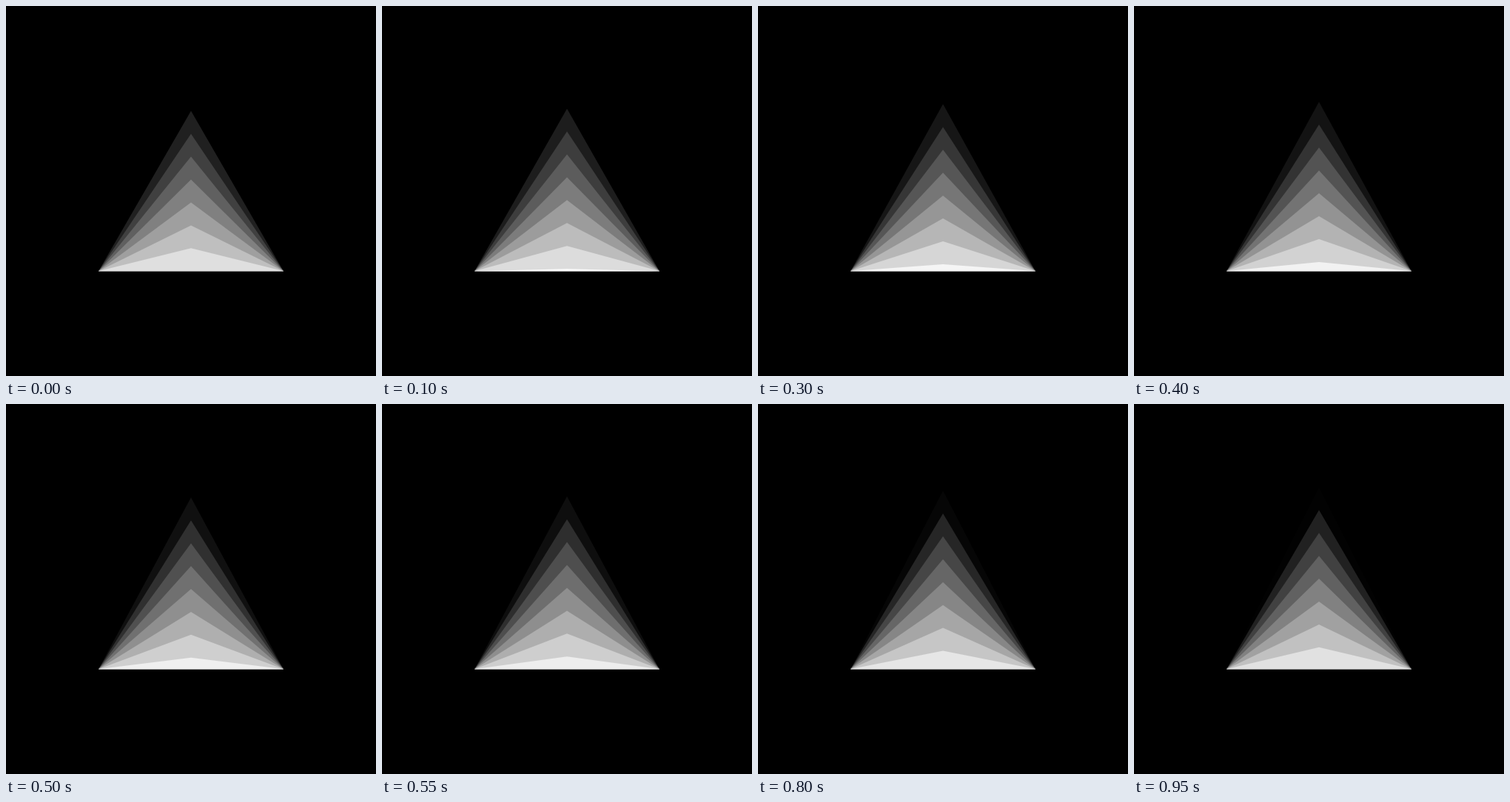
An HTML page with a canvas that plays this animation: 500 px wide and 500 px high, repeating every 1000 ms.

```html
<!DOCTYPE html>
<html lang="en">
<head>
<meta charset="utf-8">
<title>Rising triangles</title>
<style>
  html, body { margin: 0; width: 100%; height: 100%; overflow: hidden; background: #000; }
  canvas { display: block; }
</style>
</head>
<body>
<canvas id="stage" width="500" height="500"></canvas>
<script>
const ctx = document.getElementById('stage').getContext('2d');
const LOOP = 1000, STEP = 50;
const LAYERS = 8, SIDE = 250, CENTER = 250;
const HEIGHT = SIDE * Math.sqrt(3) / 2;
const BASE = CENTER + HEIGHT / 2;
const GAP = HEIGHT / (LAYERS - 1);

function triangle(level) {
  const gray = Math.round(255 * (1 - level / LAYERS));
  ctx.fillStyle = `rgb(${gray}, ${gray}, ${gray})`;
  ctx.beginPath();
  ctx.moveTo(CENTER - SIDE / 2, BASE);
  ctx.lineTo(CENTER, BASE - GAP * level);
  ctx.lineTo(CENTER + SIDE / 2, BASE);
  ctx.fill();
}

function draw(time) {
  // Motion advances in 50 ms steps; each layer climbs one level per loop.
  const phase = Math.floor((time % LOOP) / STEP) * STEP / LOOP;
  ctx.fillStyle = '#000';
  ctx.fillRect(0, 0, 500, 500);
  for (let i = LAYERS - 1; i >= 0; i--) triangle(i + phase);
}

const start = performance.now();
function tick() {
  draw(performance.now() - start);
  requestAnimationFrame(tick);
}
tick();
</script>
</body>
</html>
```
